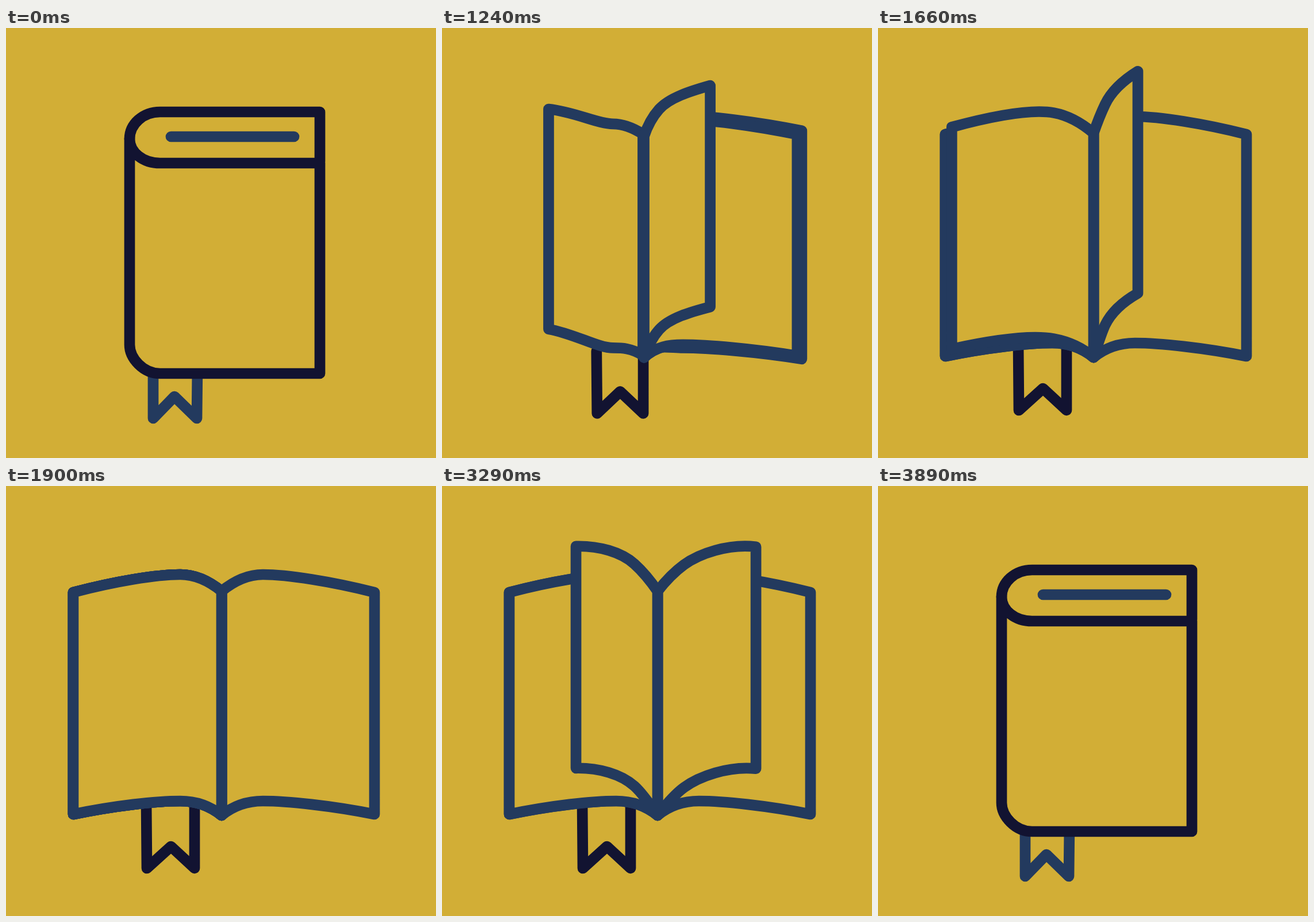
Recreate the animation shown at these times as an HTML page with a canvas. Size 748x748 px, loop 3920 ms.

```html
<!DOCTYPE html>
<html lang="en">
<head>
<meta charset="utf-8">
<title>Book</title>
<style>
  html, body { margin: 0; width: 100%; height: 100%; overflow: hidden; background: #d2ae36; }
  canvas { display: block; width: 100%; height: 100%; }
</style>
</head>
<body>
<canvas width="748" height="748"></canvas>
<script>
const PAPER = '#d2ae36', DARK = '#121331', BLUE = '#233a5e';
const LOOP = 3920, STEP = 30, TURN = 900;
const ctx = document.querySelector('canvas').getContext('2d');

const clamp = (v, min, max) => Math.min(max, Math.max(min, v));
const mix = (a, b, k) => a.map((v, i) => v + (b[i] - v) * k);
const smooth = p => p * p * (3 - 2 * p);

// Leaves are flat arrays: spine, handle, handle, knee, handle and tip of the
// top edge (x, y each), then the drop to the bottom edge at spine, knee and tip.

// An open page; turn runs from -1 (flat on the left) to 1 (flat on the right).
function page(turn, lift = 1) {
  const square = 1 - turn * turn, bend = Math.sqrt(square);
  const reach = 4 + 262 * turn, knee = 72 * turn;
  const tipY = 185 - 120 * lift * bend ** 1.7 * (1 + 0.15 * turn);
  return [
    375, 183,
    375 + knee * 0.34, 163,
    375 + knee * 0.68, 154 - 8 * bend,
    375 + knee, 154 - 22 * bend,
    375 + reach * 0.72, tipY - 19 + 38 * square ** 2,
    375 + reach, tipY,
    390, 394 - 11 * square, 386
  ];
}

// A leaf of the shut book, rounded from the spine to a level edge at y.
function shutLeaf(spineX, spineY, kneeX, tipX, y, drop) {
  return [
    spineX, spineY,
    spineX, spineY + (y - spineY) * 0.56,
    kneeX - (kneeX - spineX) * 0.55, y,
    kneeX, y,
    tipX - 96, y,
    tipX, y,
    358, drop, drop
  ];
}

const shutCover = shutLeaf(215, 193, 268, 546, 235, 366);
const shutBack = shutLeaf(215, 193, 268, 546, 146, 455);
const shutPage = shutLeaf(228, 216, 272, 496, 186, 380);
const pages = [
  { start: 0, lift: 0.94 },
  { start: 207, lift: 1 },
  { start: 414, lift: 0.88 }
];

function pageAt({ start, lift }, t, closing) {
  const z = clamp((t - start) / 163 - 1.166, -1, 1);
  return mix(page(0.9 * z + 0.1 * z ** 3, lift), shutPage, closing);
}

function coverAt(closing) {
  const leaf = mix(page(-1), shutCover, closing);
  const lift = 200 * Math.sin(Math.PI * closing) * (0.7 - closing);
  leaf[9] -= lift * 0.6;
  leaf[11] -= lift;
  return leaf;
}

function stroke(path, color) {
  ctx.strokeStyle = color;
  ctx.stroke(path);
}

function polyline(points, color) {
  const path = new Path2D();
  points.forEach(([x, y]) => path.lineTo(x, y));
  stroke(path, color);
}

function topEdge([sx, sy, ax, ay, bx, by, kx, ky, cx, cy, tx, ty]) {
  const path = new Path2D();
  path.moveTo(sx, sy);
  path.bezierCurveTo(ax, ay, bx, by, kx, ky);
  path.bezierCurveTo(kx + 1.8 * (kx - bx), ky + 1.8 * (ky - by), cx, cy, tx, ty);
  return path;
}

function outline(leaf) {
  const [sx, sy, ax, ay, bx, by, kx, ky, cx, cy, tx, ty, spine, knee, tip] = leaf;
  const path = topEdge(leaf);
  path.lineTo(tx, ty + tip);
  path.bezierCurveTo(cx, cy + (knee + tip) / 2,
    kx + 1.8 * (kx - bx), ky + knee + 1.8 * (ky - by), kx, ky + knee);
  path.bezierCurveTo(bx, by + knee, ax, ay + spine, sx, sy + spine);
  path.closePath();
  return path;
}

function drawLeaf(leaf, color) {
  const path = outline(leaf);
  ctx.fillStyle = PAPER;
  ctx.fill(path);
  stroke(path, color);
}

function drawRibbon(t) {
  const p = clamp((t - 510) / (TURN - 510), 0, 1);
  const swing = 22 * Math.sin(Math.PI * p);
  // Left, notch and right x, then top, notch and tip y.
  const [left, notch, right, top, high, low] = mix(
    [245, 287, 328, 545, 627, 665], [256, 293, 332, 590, 641, 679], p);
  const lean = p < 0.5 ? -1 : 1;
  const points = [[left + Math.min(lean, 0), top], [left, low], [notch, high],
    [right, low], [right + Math.max(lean, 0), top]];
  polyline(points.map(([x, y]) => [x + swing, y]), p < 0.5 ? DARK : BLUE);
}

function drawBack(closing) {
  const leaf = mix(page(1), shutBack, closing);
  if (closing < 0.8) return drawLeaf(leaf, BLUE);
  const [x, y] = leaf.slice(10, 12);
  ctx.fillStyle = PAPER;
  ctx.fill(outline(leaf));
  if (closing < 1) polyline([[x, 287], [x, 523]], BLUE);
  const edge = topEdge(leaf);
  edge.lineTo(x, y + 86);
  stroke(edge, DARK);
}

function draw(t) {
  ctx.fillStyle = PAPER;
  ctx.fillRect(0, 0, 748, 748);
  ctx.lineWidth = 18.7;
  ctx.lineCap = ctx.lineJoin = 'round';

  const closing = smooth(clamp((t - 500) / (TURN - 500), 0, 1) ** 1.5);
  const onRight = leaf => leaf[10] > leaf[0];
  const cover = coverAt(closing);

  drawRibbon(t);
  drawBack(closing);
  if (!onRight(cover)) drawLeaf(cover, BLUE);

  if (closing < 1) {
    const leaves = pages.map(p => pageAt(p, t, closing));
    const left = leaves.filter(leaf => !onRight(leaf)).reverse();
    [...leaves.filter(onRight), ...left].forEach(leaf => drawLeaf(leaf, BLUE));
  } else {
    polyline([[287, 189], [501, 189]], BLUE);
  }
  if (onRight(cover)) drawLeaf(cover, DARK);
}

// Opening runs the closing motion backwards.
function turnTime(ms) {
  const stepped = begin => clamp(Math.floor((ms - begin) / STEP) * STEP, 0, TURN);
  return TURN - stepped(1000) + stepped(2990);
}

function tick() {
  draw(turnTime(performance.now() % LOOP));
  requestAnimationFrame(tick);
}
tick();
</script>
</body>
</html>
```
